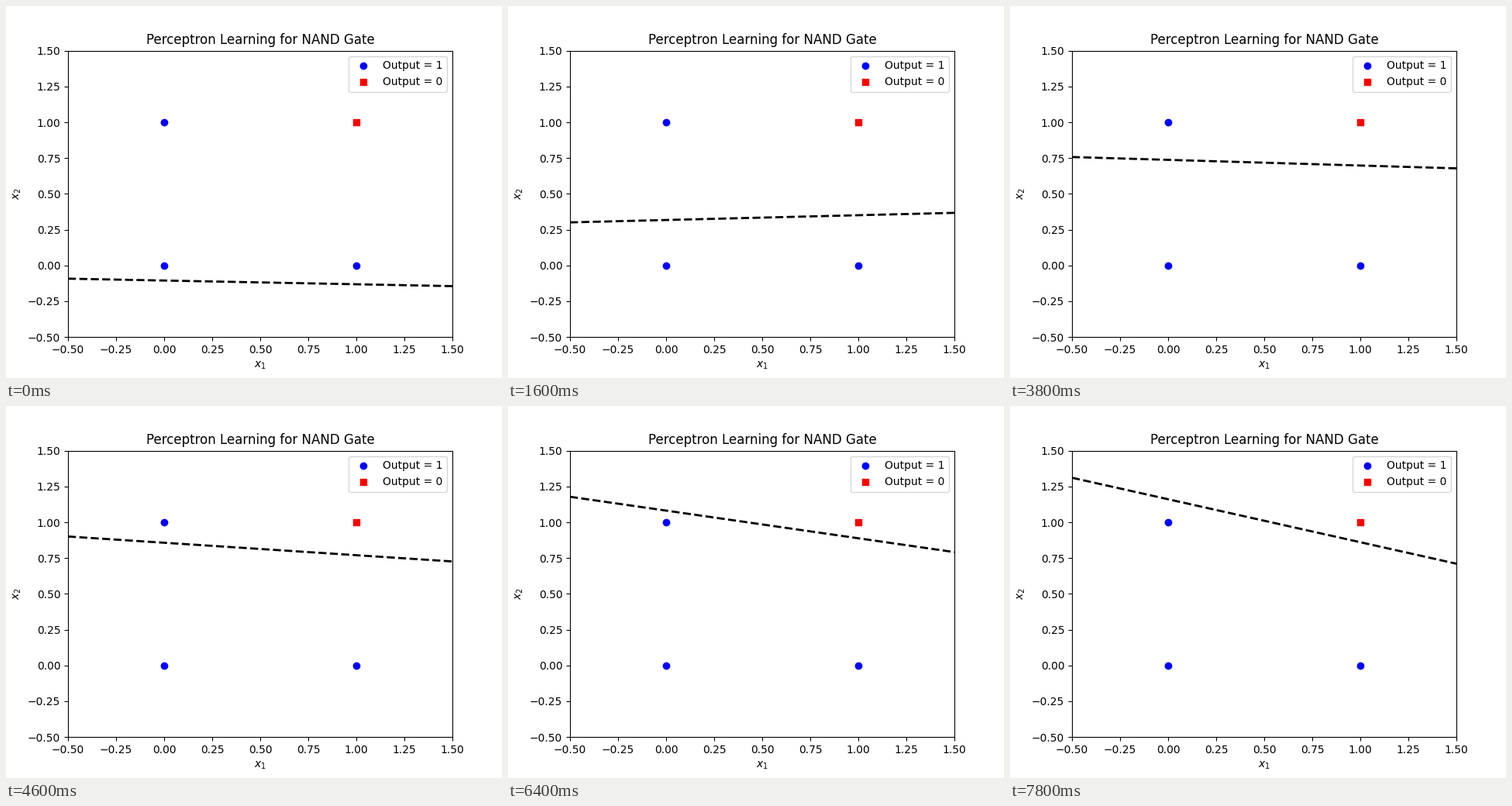
These frames come from a looping animation (640x480 px, 8000 ms). A matplotlib script:

```python
import matplotlib.pyplot as plt
import numpy as np
from matplotlib.animation import FuncAnimation

FRAMES = 40
INTERVAL = 200
RATE = 0.7

inputs = np.array([[0, 0], [0, 1], [1, 0], [1, 1]])
targets = np.array([1, 1, 1, 0])


def sigmoid(z):
    return 1 / (1 + np.exp(-z))


def train(steps):
    """Cycle through the samples, one gradient step each; keep every state."""
    w = np.array([-0.0278, -1.067])
    b = -0.2077
    states = []
    for i in range(steps):
        x, t = inputs[i % 4], targets[i % 4]
        out = sigmoid(w @ x + b)
        delta = RATE * (t - out) * out * (1 - out)
        w = w + delta * x
        b = b + delta
        states.append((*w, b))
    return states


states = train(FRAMES)
xs = np.array([-0.5, 1.5])

fig, ax = plt.subplots(figsize=(6.4, 4.8), dpi=100)
for value, color, marker in ((1, "blue", "o"), (0, "red", "s")):
    pts = inputs[targets == value]
    ax.scatter(pts[:, 0], pts[:, 1], color=color, marker=marker,
               label=f"Output = {value}")
line, = ax.plot([], [], "k--", lw=2)

ax.set_xlim(-0.5, 1.5)
ax.set_ylim(-0.5, 1.5)
ax.set_xlabel("$x_1$")
ax.set_ylabel("$x_2$")
ax.set_title("Perceptron Learning for NAND Gate")
ax.legend(loc="upper right")


def update(frame):
    w1, w2, b = states[frame]
    line.set_data(xs, -(w1 * xs + b) / w2)
    return line,


anim = FuncAnimation(fig, update, frames=FRAMES, interval=INTERVAL,
                     repeat=True, repeat_delay=0)
plt.show()
```
